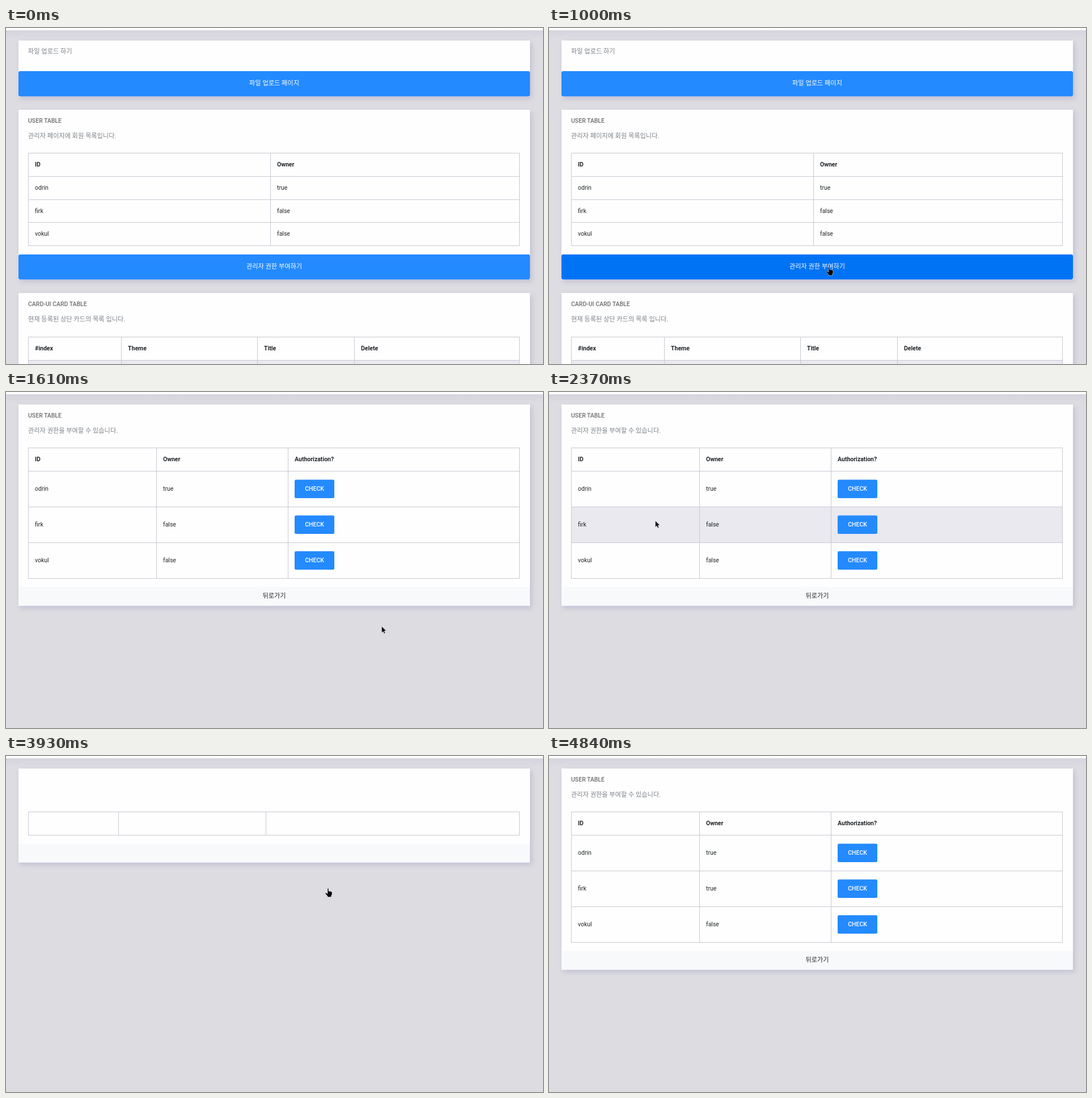
Animation, 947 px wide and 592 px high, one loop 5620 ms. Source, as an HTML page:

```html
<!DOCTYPE html>
<html lang="ko">
<head>
<meta charset="utf-8">
<title>User table</title>
<style>
  html, body { margin: 0; width: 100%; height: 100%; overflow: hidden; background: #dddce1; }
  svg { display: block; width: 947px; height: 592px; }
  text { font: 400 10.5px Roboto, "Noto Sans CJK KR", "Noto Sans CJK", sans-serif; fill: #212529; }
  .ko { font-size: 11.2px; }
  .dim { fill: #7b8087; }
  .cap { font-weight: 500; fill: #6c6c6f; }
  .head { font-weight: 700; }
  .mid { text-anchor: middle; }
  .btn { fill: #fff; text-anchor: middle; }
  .check { font-weight: 500; }
  .card { fill: #fefefe; filter: drop-shadow(3px 4px 4px rgba(80, 80, 160, .2)); }
  .line { fill: none; stroke: #c8c8d3; }
</style>
</head>
<body>
<svg id="stage" viewBox="0 0 947 592">
  <defs>
    <linearGradient id="fall" x2="0" y2="1">
      <stop stop-color="#d5d4de"/>
      <stop offset="1" stop-color="#dddce1"/>
    </linearGradient>
  </defs>
  <rect width="947" height="592" fill="#dddce1"/>
  <rect y="4" width="947" height="16" fill="url(#fall)"/>
  <rect width="947" height="4" fill="#fefefe"/>
</svg>
<script>
const LOOP = 5620, STEP = 76.6;
const LEFT = 22, WIDTH = 902, MIDDLE = LEFT + WIDTH / 2;
const EDGE = 39.5, END = 905.5;
const BLUE = [36, 138, 255], DEEP = [0, 115, 245];
const PALE = [248, 249, 251], GREY = [243, 245, 247];
const people = ["odrin", "firk", "vokul"];
const stage = document.getElementById("stage");

function add(parent, tag, attrs = {}, text) {
  const el = document.createElementNS("http://www.w3.org/2000/svg", tag);
  for (const name in attrs) el.setAttribute(name, attrs[name]);
  if (text) el.textContent = text;
  parent.append(el);
  return el;
}
const label = (g, x, y, text, cls = "") => add(g, "text", { x, y, class: cls }, text);
const show = (el, on) => el.setAttribute("display", on ? "inline" : "none");
const rgb = color => `rgb(${color})`;

function box(g, x, y, width, height, attrs) {
  return { el: add(g, "rect", { x, y, width, height, ...attrs }), x, y, width, height };
}
const hit = (b, p) => p.x >= b.x && p.x < b.x + b.width && p.y >= b.y && p.y < b.y + b.height;

function card(g, y, height, title, note) {
  box(g, LEFT, y, WIDTH, height, { class: "card" });
  if (title) label(g, EDGE - .5, y + 23, title, "cap");
  if (note) label(g, EDGE - .5, y + (title ? 50 : 23), note, "ko dim");
}

function bar(g, y, height, text, color, cls) {
  const b = box(g, LEFT, y, WIDTH, height, { rx: color === BLUE ? 3 : 0, fill: rgb(color) });
  label(g, MIDDLE, y + height / 2 + 2.7, text, "ko " + cls);
  return b;
}

// Header line plus body rows; returns each row's hover box, cells and centre.
function table(g, top, cols, heads, rows, rowHeight) {
  const snap = y => Math.floor(y) + .5;
  const xs = [EDGE, ...cols];
  const lineAt = i => snap(top + (i && 41 + (i - 1) * rowHeight));
  const cells = (y, texts, cls) => texts.map((s, i) => label(g, xs[i] + 11.5, y + 3.4, s, cls));
  const body = rows.map((texts, i) => {
    const y = lineAt(i + 1), height = lineAt(i + 2) - y, centre = y + height / 2;
    const hover = box(g, EDGE, y, END - EDGE, height, { fill: "#e9e9ef" });
    return { hover, centre, cells: cells(centre, texts) };
  });
  cells(top + 20.5, heads, "head");
  let d = [...xs, END].map(x => `M${x} ${lineAt(0)}V${lineAt(rows.length + 1)}`).join("");
  for (let i = 0; i < rows.length + 2; i++) d += `M${EDGE - .5} ${lineAt(i)}H${END + .5}`;
  add(g, "path", { d, class: "line" });
  return body;
}
const userRows = () => people.map((name, i) => [name, i ? "false" : "true"]);

// Overview page
const home = add(stage, "g");
card(home, 22, 98.5, "", "파일 업로드 하기");
bar(home, 76, 44.5, "파일 업로드 페이지", BLUE, "btn");
card(home, 144, 299, "USER TABLE", "관리자 페이지에 회원 목록입니다.");
const homeBody = table(home, 220.5, [466.5], ["ID", "Owner"], userRows(), 40.7);
const grant = bar(home, 399, 44, "관리자 권한 부여하기", BLUE, "btn");
card(home, 467, 150, "CARD-UI CARD TABLE", "현재 등록된 상단 카드의 목록 입니다.");
table(home, 544, [203.5, 443.5, 614.5], ["#index", "Theme", "Title", "Delete"], [[]], 41);

// Page while loading
const empty = add(stage, "g");
card(empty, 22, 165.5);
table(empty, 98.5, [198.5, 458.5], [], [], 0);
bar(empty, 154.5, 33, "", PALE, "mid");

// Permission page
const rights = add(stage, "g");
card(rights, 22, 354.5, "USER TABLE", "관리자 권한을 부여할 수 있습니다.");
const body = table(rights, 98.5, [265.5, 497.5], ["ID", "Owner", "Authorization?"], userRows(), 63);
const checks = body.map(({ centre }) => {
  const b = box(rights, 509, centre - 16.5, 70, 32.5, { rx: 2.5 });
  label(rights, 544, centre + 3.4, "CHECK", "btn check");
  return b;
});
const back = bar(rights, 343.5, 33, "뒤로가기", PALE, "mid");

// Pointers, tip at 0,0
const arrow = add(stage, "path", {
  d: "M.5 0V11.2L3 8.8L4.8 12.6L6.7 11.7L5 8.1L8.4 7.8Z",
  fill: "#0c0c14", stroke: "#fff", "stroke-width": .4
});
const hand = add(stage, "path", {
  d: "M-1 .6Q0-.8 1 .6V5L3 5.2L5 5.8L7 6.6V11L5.6 13.6V15.5H-1V14L-5 9.2Q-5 7.4-3 8.2L-1 9.8Z",
  fill: "#050505", stroke: "#fff", "stroke-width": .5
});

// Pointer stops as [step, x, y], eased in between
const stops = [
  [0, 640, 590], [6, 508, 306], [10, 494, 420.5], [13, 494, 420.5],
  [21, 662, 413], [23, 560, 477], [28, 296, 232], [34, 78, 222],
  [43, 574, 230], [49, 568, 233], [51, 568, 233], [56, 480, 348],
  [59, 477, 298], [63, 503, 467]
];

function pointer(k) {
  const i = Math.max(1, stops.findIndex(s => s[0] >= k));
  const [a, ax, ay] = stops[i - 1], [b, bx, by] = stops[i];
  const u = (k - a) / (b - a), e = u * u * (3 - 2 * u);
  return { x: ax + (bx - ax) * e, y: ay + (by - ay) * e };
}

// Hover colour settles over two steps.
function tint(b, k, from, to) {
  const u = (hit(b, pointer(k)) + hit(b, pointer(k - 1))) / 2;
  b.el.setAttribute("fill", rgb(from.map((c, i) => Math.round(c + (to[i] - c) * u))));
}

function draw(t) {
  const visible = t >= 70 && t < 4840;
  const k = visible ? Math.floor((t + 8) / STEP) : 0;
  const p = pointer(k);
  const first = t < 1080;
  const loading = (t >= 1080 && t < 1230) || (t >= 3930 && t < 4010);
  show(home, first);
  show(empty, loading);
  show(rights, !first && !loading);

  for (const { hover } of first ? homeBody : body) show(hover.el, visible && hit(hover, p));
  if (first) tint(grant, k, BLUE, DEEP);
  checks.forEach(b => tint(b, k, BLUE, DEEP));
  tint(back, k, PALE, GREY);
  body[1].cells[1].textContent = t < 3930 ? "false" : "true";

  const links = first ? [grant] : [...checks, back];
  const pointing = loading || links.some(b => hit(b, p));
  show(hand, visible && pointing);
  show(arrow, visible && !pointing);
  (pointing ? hand : arrow).setAttribute("transform", `translate(${p.x} ${p.y})`);
}

const start = performance.now();
function tick() {
  draw((performance.now() - start) % LOOP);
  requestAnimationFrame(tick);
}
tick();
</script>
</body>
</html>
```
